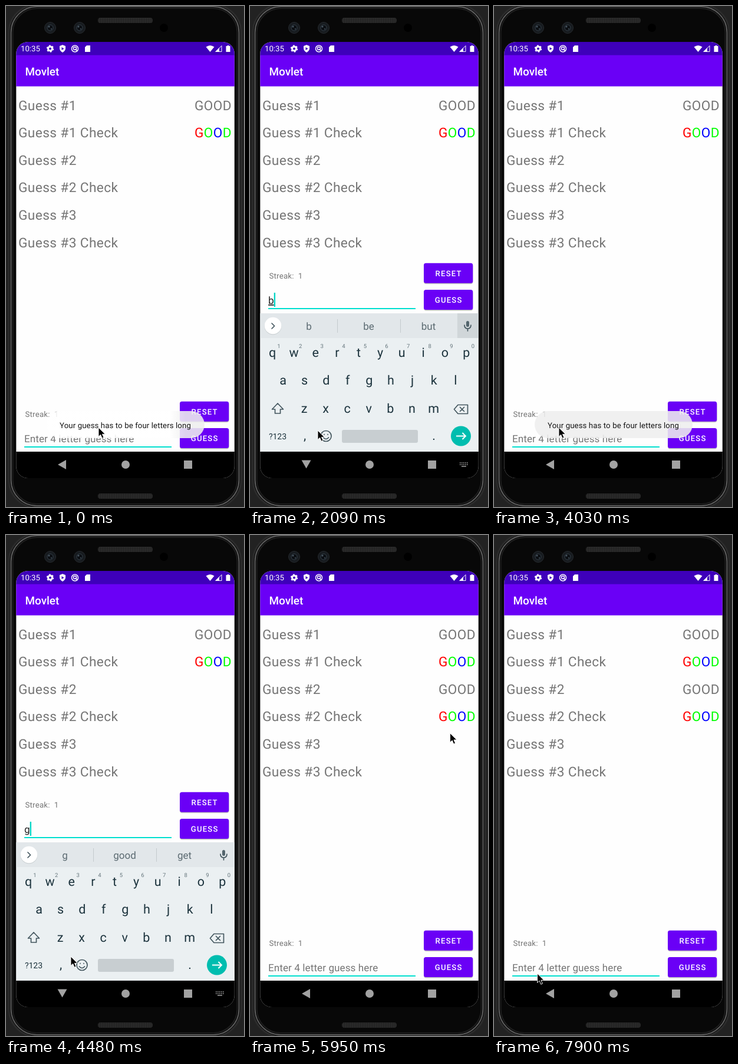
Animation, 404 px wide and 851 px high, one loop 8 s. Source, as an HTML page:

```html
<!DOCTYPE html>
<html lang="en">
<head>
<meta charset="utf-8">
<style>
html, body { margin: 0; width: 100%; height: 100%; overflow: hidden; background: #222; }
svg { display: block; width: 404px; height: 851px; font-family: Roboto, sans-serif; text-rendering: geometricPrecision; }
.row { font-size: 22.67px; letter-spacing: .4px; fill: #757575; }
.btn { font-size: 13.2px; font-weight: 500; letter-spacing: 1.18px; fill: #fff; text-anchor: middle; }
.mid { text-anchor: middle; }
.entry { font-size: 17px; letter-spacing: .12px; }
.line { fill: none; stroke: #43565e; stroke-width: 1.7; stroke-linejoin: round; stroke-linecap: round; }
</style>
</head>
<body>
<svg viewBox="0 0 404 851">
  <defs>
    <clipPath id="screen"><rect x="17.300" y="61" width="370.500" height="741" rx="20"/></clipPath>
    <pattern id="mesh" width="3" height="3" patternUnits="userSpaceOnUse">
      <rect width="3" height="3" fill="#2e2e2e"/><circle cx="1.5" cy="1.5" r=".9" fill="#151515"/>
    </pattern>
    <linearGradient id="pale" gradientUnits="userSpaceOnUse" x1="69" x2="337">
      <stop offset=".78" stop-color="#fff"/><stop offset=".88" stop-color="#eee"/>
    </linearGradient>
  </defs>

  <!-- phone body -->
  <rect x="5" y="-2" width="394" height="854" rx="47" fill="#050505" stroke="#2c2c2c" stroke-width="3"/>
  <rect x="8.5" y="1" width="387" height="848" rx="44" fill="none" stroke="#5e5e5e" stroke-width="2"/>
  <rect x="11.5" y="4" width="381" height="842" rx="41" fill="#080808" stroke="#1e1e1e" stroke-width="2"/>
  <rect x="156" y="20" width="93" height="9" rx="4" fill="url(#mesh)"/>
  <rect x="156" y="828" width="93" height="9" rx="4" fill="url(#mesh)"/>
  <g id="lenses"></g>
  <circle cx="268" cy="37" r="7" fill="#000"/>

  <g clip-path="url(#screen)">
    <rect x="17" y="61" width="371" height="741" fill="#fefefe"/>
    <rect x="17" y="61" width="371" height="23" fill="#3e00ba"/>
    <rect x="17" y="83.500" width="371" height="53" fill="#6a00f6"/>
    <g fill="#fff">
      <text x="25" y="77" font-size="13.2">10:35</text>
      <circle cx="75" cy="72.500" r="3.500" fill="none" stroke="#fff" stroke-width="3"/>
      <circle cx="75" cy="72.500" r="5.200" fill="none" stroke="#fff" stroke-width="2" stroke-dasharray="2.700 2.745"/>
      <path d="M96 66l5 2v4q0 4-5 7-5-3-5-7v-4z"/>
      <path d="M94.500 70v5l4-2.500z" fill="#3e00ba"/>
      <g fill="none" stroke="#fff" stroke-width="1.500">
        <circle cx="117" cy="72.500" r="5.500"/><circle cx="117" cy="72" r="2.500"/><path d="M118 73l3 4"/>
      </g>
      <path d="M137 67h6v11h-9v-8z"/>
      <path d="M339.500 69.500q7-5 14 0l-7 8.500z"/>
      <path d="M356 77.500l10-10v10z" fill="none" stroke="#fff"/><path d="M355 78l7-7v7z"/>
      <path d="M373.500 68h2v-1h3v1h2v10h-7z"/>
      <text x="32.500" y="117.500" font-size="18.900" font-weight="500">Movlet</text>
    </g>
    <g id="rows" class="row"></g>

    <g id="form">
      <text x="32.500" y="697.500" font-size="13.200" letter-spacing=".24" fill="#757575" xml:space="preserve">Streak:  1</text>
      <g id="buttons"></g>
      <rect x="31" y="748" width="250" height="2" fill="#00dfcf"/>
      <text id="hint" class="entry" x="31" y="741" fill="#757575">Enter 4 letter guess here</text>
      <text id="entry" class="entry" x="31" y="741" fill="#222" text-decoration="underline"></text>
      <rect id="caret" x="31" y="722" width="2.300" height="24" fill="#00d5c5"/>
    </g>

    <rect x="17" y="757" width="371" height="45" fill="#000"/>
    <g fill="#a2a2a2">
      <path id="back" d="M-7.500 0L6.500-8V8z"/>
      <circle cx="203" cy="779" r="7"/>
      <rect x="302" y="772" width="14" height="14"/>
      <g id="imeIcon" fill="none" stroke="#a2a2a2" stroke-width="1.700" stroke-dasharray="1.700 1.300">
        <path d="M356 776h14M356 779h14"/><path d="M359 782h8" stroke-dasharray="none"/>
      </g>
    </g>

    <g id="toast">
      <rect id="toastBox" x="69" y="688" width="268" height="46" rx="23" fill-opacity=".88"/>
      <text class="mid" x="202.500" y="716.500" font-size="13.200" letter-spacing=".11" fill="#151515">Your guess has to be four letters long</text>
    </g>

    <g id="keyboard">
      <rect x="17" y="522" width="371" height="235" fill="#ebf0f2"/>
      <rect x="17" y="522" width="371" height="42" fill="#e2e7ea"/>
      <rect id="micBox" x="352" y="522" width="36" height="42" fill="#d0d6d9"/>
      <circle cx="39" cy="544" r="14.500" fill="#cdd3d5"/><circle cx="39" cy="543" r="14.300" fill="#fff"/>
      <path class="line" d="M37 539l4.500 4.500-4.500 4.500"/>
      <path d="M148.500 532v23M255.500 532v23" stroke="#c3cacd"/>
      <g id="words" class="mid" font-size="17" fill="#5c6b72"></g>
      <rect x="367" y="535" width="5" height="10" rx="2.500" fill="#53656d"/>
      <path class="line" d="M364 542q0 6 5.500 6t5.500-6M369.500 548v4"/>
      <g id="keys" class="mid" font-size="21.500" fill="#1c333d"></g>
      <path class="line" d="M47 675l9.500 10h-5v7h-9v-7h-5z"/>
      <path class="line" d="M353 677.500h16.500v15H353l-6.500-7.500zM356.500 681.500l7 7M363.500 681.500l-7 7"/>
      <circle class="line" cx="129" cy="730.500" r="9"/>
      <path class="line" d="M124.500 733q4.500 5 9 0M126 727.500v.5M132 727.500v.5"/>
      <rect x="156" y="720" width="129" height="22" rx="3" fill="#c8ced1"/>
      <circle cx="358" cy="730.500" r="17" fill="#00bdaf"/>
      <path d="M350 730.500h16M360.500 725l5.500 5.500-5.500 5.500" fill="none" stroke="#fff" stroke-width="2"/>
    </g>
  </g>
  <path id="pointer" d="M0 0v15.500l3.600-3.300 2.500 6 2.800-1.200-2.500-5.700h4.900z" fill="#000" stroke="#fff" stroke-width=".9"/>
</svg>
<script>
const $ = id => document.getElementById(id);
const show = (id, on) => $(id).setAttribute('visibility', on ? 'visible' : 'hidden');
const move = (id, x, y, turn = 0) => $(id).setAttribute('transform', `translate(${x} ${y}) rotate(${turn})`);
const clamp = v => Math.max(0, Math.min(1, v));

$('lenses').innerHTML = [75, 125].map(x => `<circle cx="${x}" cy="37" r="9.500" fill="#171b1f" stroke="#262a2e"/>
  <circle cx="${x}" cy="37" r="5" fill="#0b0e12" stroke="#35404a"/><circle cx="${x - 2}" cy="35" r="1.500" fill="#4a5863"/>
  <circle cx="${x + 2}" cy="39" r="1.200" fill="#39444d"/>`).join('');

const answer = ['#f00', '#0f0', '#00f', '#0f0'].map((c, i) => `<tspan fill="${c}">${'GOOD'[i]}</tspan>`).join('');
$('rows').innerHTML = [0, 1, 2, 3, 4, 5].map(i => {
  const y = 176.5 + 46.65 * i;
  const reply = i < 4 ? `<text ${i > 1 ? `id="reply${i}"` : ''} x="320" y="${y}">${i % 2 ? answer : 'GOOD'}</text>` : '';
  return `<text x="21" y="${y}">Guess #${(i >> 1) + 1}${i % 2 ? ' Check' : ''}</text>` + reply;
}).join('');

$('buttons').innerHTML = [['RESET', 671.7], ['GUESS', 717]].map(([name, y]) =>
  `<rect x="295" y="${y + 1.5}" width="83.500" height="34" rx="4" fill="#000" opacity=".25"/>
   <rect x="295" y="${y}" width="83.300" height="34" rx="3.500" fill="#6a00f6"/>
   <text class="btn" x="337.200" y="${y + 22}">${name}</text>`).join('');

const letters = (str, x, y) => [...str].map((c, i) => `<text x="${x + 36.6 * i}" y="${y}">${c}</text>`).join('');
$('keys').innerHTML = letters('qwertyuiop', 38, 595.5) + letters('asdfghjkl', 56, 642.5) + letters('zxcvbnm', 92, 690.5) +
  '<text x="47" y="735.500" font-size="14">?123</text><text x="93" y="737">,</text><text x="312" y="737">.</text>' +
  `<g font-size="9.500" fill="#66767d">${letters('1234567890', 49, 581)}</g>`;

// keyboard sessions: open, close, then [time, text, suggestions]
const sessions = [
  { open: 1340, close: 2520, typed: [[1340, '', 'I the you'], [1950, 'b', 'b be but']] },
  { open: 4150, close: 4990, typed: [[4150, '', 'I the you'], [4380, 'g', 'g good get'], [4500, 'go', 'go good going'],
    [4620, 'goo', 'goo good Good'], [4750, 'good', 'good Good goodnight'], [4900, '', 'good Good goodnight']] }
];
const path = [[0, 157, 716], [150, 157, 716], [450, 264, 702], [890, 115, 721], [2690, 115, 721], [4030, 110, 716],
  [5100, 110, 716], [5500, 215, 520], [5950, 339.5, 337], [6200, 371, 257], [6400, 325, 300], [6850, 73.5, 774],
  [7350, 73.5, 774], [7600, 73.5, 794], [7900, 73.5, 745], [8000, 73.5, 745]];

function pointerAt(t) {
  const i = path.findIndex(p => p[0] > t);
  const [a, b] = [path[i - 1], path[i]];
  const k = (t - a[0]) / (b[0] - a[0]);
  return [a[1] + (b[1] - a[1]) * k, a[2] + (b[2] - a[2]) * k];
}

function draw(t) {
  const s = sessions.find(s => t >= s.open && t < s.close + 150);
  const rise = s ? clamp((t - s.open) / 150) : 0;
  const hide = s ? clamp((t - s.close) / 150) : 0;
  const up = s && rise === 1 && !hide;
  const [, text, words] = s ? s.typed.filter(k => k[0] <= t).pop() : [0, '', ''];
  const value = hide ? '' : text;

  move('form', 0, up ? -235 : 0);
  show('hint', !value);
  $('entry').textContent = value;
  $('caret').setAttribute('x', 31 + (value ? $('entry').getComputedTextLength() : 0));
  const fresh = [1950, 2090, 2520, 4380, 4500, 4620, 4750, 4900].some(k => t >= k && t < k + 500);
  show('caret', fresh || Math.floor((t - 150) / 500) % 2 === 0);

  show('reply2', t >= 4900);
  show('reply3', t >= 4900);

  show('keyboard', s);
  show('micBox', text === 'b');
  $('keyboard').setAttribute('opacity', rise * (1 - hide ** 2.8));
  move('keyboard', 0, 40 * (1 - rise) ** 2 + 8.5 * hide);
  $('words').innerHTML = words.split(' ').map((w, i) => `<text x="${[100, 201.5, 303][i]}" y="550">${w}</text>`).join('');

  move('back', 95.5, 779 - rise * (1 - hide), -90 * rise * (1 - hide));
  show('imeIcon', up);

  const first = t < 1500;
  $('toast').setAttribute('opacity', first ? 1 : t < 4500 ? clamp((t - 2540) / 210) : 0);
  $('toastBox').setAttribute('fill', first ? 'url(#pale)' : '#eee');

  move('pointer', ...pointerAt(t));
}

function loop(now) {
  draw(now % 8000);
  requestAnimationFrame(loop);
}
draw(0);
requestAnimationFrame(loop);
</script>
</body>
</html>
```
